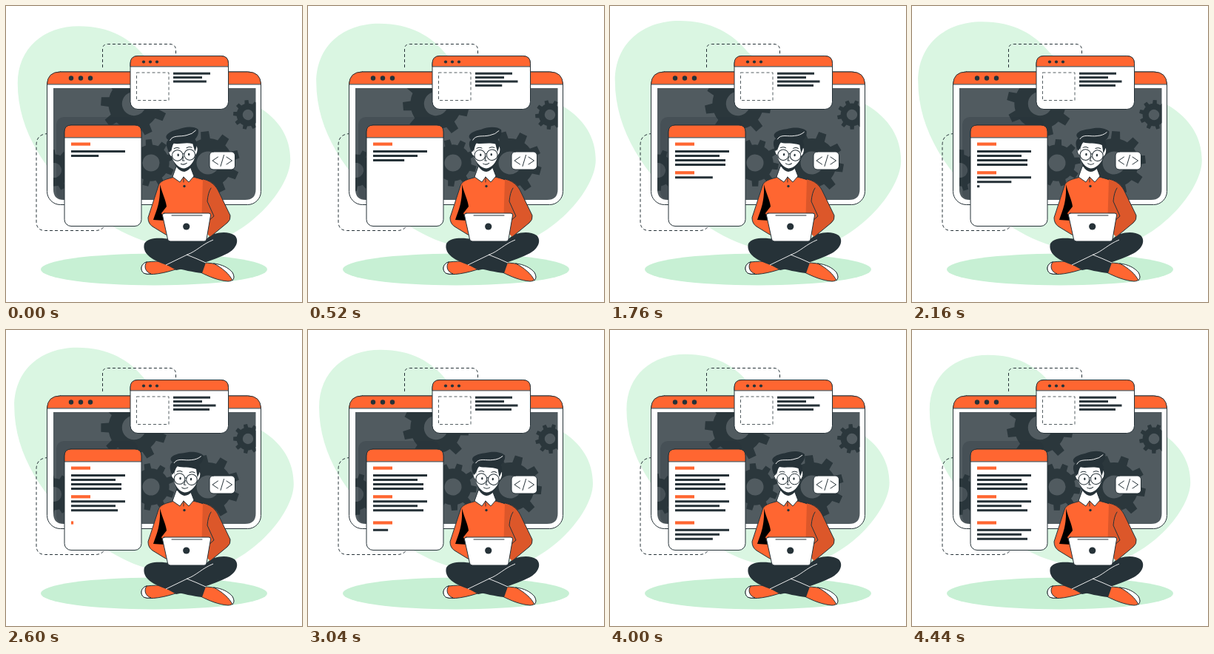
Write an HTML page that moves like this. It is 400x400 px and loops after 5680 ms.

```html
<!DOCTYPE html>
<html lang="en">
<head>
<meta charset="utf-8">
<title>Developer at work</title>
<style>
html, body { margin: 0; width: 100%; height: 100%; overflow: hidden; background: #fff; }
svg { display: block; width: 100vw; height: 100vh; }
.ink { stroke: #263238; stroke-width: 1; stroke-linejoin: round; stroke-linecap: round; }
.dash { fill: none; stroke: #263238; stroke-width: 1; stroke-dasharray: 4 3; }
.none { fill: none; }
.white { fill: #fff; }
.dark { fill: #263238; }
.orange { fill: #ff6631; }
.shade { fill: #dc572a; }
.glint { fill: none; stroke: #fff; stroke-width: .9; }
</style>
</head>
<body>
<svg viewBox="0 0 400 400" xmlns="http://www.w3.org/2000/svg">
  <defs>
    <clipPath id="screen"><path d="M64 111H337.500V248Q337.500 262 323 262H78Q64 262 64 248Z"/></clipPath>
  </defs>

  <path id="blob" fill="#daf6e2" d="M24 108C24 62 58 34 103 34C143 34 169 50 187 72C222 108 290 112 333 137C362 154 376 178 376 206C376 246 312 319 238 319C185 319 142 294 108 264C62 224 24 170 24 108Z"/>
  <ellipse cx="200" cy="356" rx="153" ry="21.500" fill="#c7f0d4"/>

  <path class="dash" d="M130.500 83V58Q130.500 51.500 138 51.500H221Q229.500 51.500 229.500 60V68"/>
  <path class="dash" d="M57 172.500Q41 173 41 188V291Q41 303.500 53 303.500H120Q131 303.500 133 296"/>

  <!-- main window -->
  <rect class="ink white" x="55.500" y="89" width="289" height="179.500" rx="18"/>
  <path class="ink orange" d="M55.500 105.500Q56 89 73.500 89H326.500Q344 89 344.500 105.500Z"/>
  <g clip-path="url(#screen)">
    <rect x="64" y="111" width="274" height="151" fill="#515b60"/>
    <g id="gears" fill="#2b373c" fill-rule="evenodd"></g>
    <rect x="68" y="150" width="110" height="112" rx="10" fill="#263238" opacity=".25"/>
  </g>

  <!-- cards -->
  <rect class="ink white" x="168" y="67.500" width="132.500" height="72" rx="10"/>
  <path class="ink orange" d="M168 81.500V77.500Q168 67.500 178 67.500H290.500Q300.500 67.500 300.500 77.500V81.500Z"/>
  <rect class="dash" x="176.500" y="90" width="43.500" height="37.500" style="stroke:#555f63"/>
  <rect class="ink white" x="79" y="161" width="104" height="136.500" rx="9"/>
  <path class="ink orange" d="M79 177.500V170Q79 161 88 161H174Q183 161 183 170V177.500Z"/>
  <g id="dots" class="dark"></g>
  <g id="lines"></g>

  <!-- code badge -->
  <rect class="ink white" x="275" y="197" width="34.500" height="24" rx="5"/>
  <path class="ink none" d="M286.500 204L279 209L286.500 214M298 204L305.500 209L298 214M294.500 201.500L290 216.500"/>

  <!-- legs and shoes -->
  <path class="ink orange" d="M216 345C207 345 198 345 190 346C182 348 181 357 186 361C194 365 215 361 232 355Z"/>
  <path class="ink white" d="M190 346C182 348 181 357 186 361Q191 363 196 362C188 359 186 352 190 346Z"/>
  <path class="ink orange" d="M268 347C281 347 297 351 305 359C310 366 308 372 300 372C287 371 275 366 263 360Z"/>
  <path class="ink white" d="M281 348C292 349 301 354 306 360Q310 367 306 371C302 362 292 354 281 348Z"/>
  <path class="dark" d="M219 314H272C279 306 299 303 309 310C316 317 311 328 300 334C280 344 252 353 230 357L212 347L240 330Z"/>
  <path class="dark" d="M187 321C192 312 210 313 222 315C240 321 258 335 270 347L265 361C240 358 211 350 197 341C188 335 185 328 187 321Z"/>
  <path class="glint" d="M216 350L245 336C258 331 265 322 280 316M244 336Q257 341 270 347"/>

  <!-- torso -->
  <path class="ink orange" d="M228 231C216 234 208 236 206 243L192 286Q192 294 198 298L216 309H272L274 240C268 234 260 233 253 231Z"/>
  <path d="M208 241C211 253 216 262 217 271L210 280L215 290L199 289C204 275 209 264 208 241Z"/>
  <path class="shade" d="M266 234C279 236 284 243 288 252L303 283Q304 289 299 293L276 312L264 300Z"/>
  <path class="ink none" d="M262 233C277 235 284 243 288 252L303 283Q304 289 299 293L276 312M273 291L281 284L272 264Q273 252 277 246"/>
  <path class="ink white" d="M230 217L225 231L235 238L240 231L247 238L254 230L249 217Z"/>
  <path class="ink none" d="M240 231V238"/>
  <circle class="dark" cx="241" cy="243.500" r="1.700"/>

  <g id="head">
    <path class="dark" d="M226 203C228 215 233 223 241 224C249 223 254 215 257 203Z"/>
    <path class="ink white" d="M225 190C219 187 220 203 227 203ZM257 190C263 187 262 203 255 203Z"/>
    <path class="white" d="M225.500 184H257V203C255 212 248 219 241 219.500C234 219 227 211 225.500 203Z"/>
    <path class="dark" d="M222.500 197C218 189 218 182 222 180C214 174 225 168 236 166.500C245 163 258 163 263 168C264 175 260 179 258 181C262 186 259 193 257 198L254.500 187C245 184 236 187 229 185C226 188 227 193 222.500 197Z"/>
    <path class="glint" d="M224 181C228 173 238 177 247 175Q255 174 260 169"/>
    <g class="ink none">
      <circle cx="233" cy="201.500" r="7.300"/><circle cx="249.500" cy="201.500" r="7.300"/>
      <path d="M240.300 200Q241.300 199 242.200 200M241 203L239.500 209H242M237 213Q241 215.500 245 212.500M229 192Q233 190 236 192M246 192Q250 190 253 192"/>
    </g>
    <ellipse class="dark" cx="234" cy="201" rx="1.200" ry="1.800"/>
    <ellipse class="dark" cx="248.500" cy="201" rx="1.200" ry="1.800"/>
  </g>

  <!-- laptop -->
  <path class="ink white" d="M214 280H274Q277 280 276.500 283L271 315Q270.500 318 268 318H222Q219 318 218.500 315L211.500 283Q211 280 214 280Z"/>
  <path class="ink none" d="M224 283H265"/>
  <circle class="dark" cx="243.700" cy="298" r="4.600"/>
</svg>
<script>
const LOOP = 5680, END = 4440, CYCLE = 6000, TYPE = 500;
const TEETH = 9, GEAR_ANGLE = 24;
const NS = "http://www.w3.org/2000/svg";
const $ = id => document.getElementById(id);

function add(parent, tag, attrs) {
  const el = document.createElementNS(NS, tag);
  for (const k in attrs) el.setAttribute(k, attrs[k]);
  return parent.appendChild(el);
}

function gearPath(r) {
  const step = 2 * Math.PI / TEETH, root = r * 0.77, hole = r * 0.36;
  const at = (rad, turn) => {
    const a = turn * step;
    return (rad * Math.cos(a)).toFixed(2) + " " + (rad * Math.sin(a)).toFixed(2);
  };
  let d = "";
  for (let i = 0; i < TEETH; i++) {
    d += (i ? "L" : "M") + at(root, i - 0.27) + "L" + at(r, i - 0.18) +
      "L" + at(r, i + 0.18) + "L" + at(root, i + 0.27) +
      `A${root} ${root} 0 0 1 ` + at(root, i + 0.73);
  }
  return d + `ZM${hole} 0A${hole} ${hole} 0 1 0 ${-hole} 0A${hole} ${hole} 0 1 0 ${hole} 0Z`;
}

const gears = [[173, 132, 45], [196, 212, 32], [273, 212, 43], [327, 147, 20], [65, 222, 28]]
  .map(([x, y, r]) => ({ x, y, el: add($("gears"), "path", { d: gearPath(r) }) }));

for (let i = 0; i < 3; i++) {
  add($("dots"), "circle", { cx: 88 + 13 * i, cy: 97.5, r: 3.2 });
  add($("dots"), "circle", { cx: 186 + 9 * i, cy: 75.5, r: 2.1 });
}

const lines = [];
function addLine(x, y, w, start, heading) {
  const h = heading ? 4.2 : 3;
  const fill = heading ? "#ff6631" : "#263238";
  lines.push({ w, start, el: add($("lines"), "rect", { x, y: y - h / 2, height: h, fill }) });
}

// A heading, then body rows that each begin one step later.
function addBlock(y, gap, rows, start, step) {
  addLine(88, y, 26, start, true);
  [73, 60, 68, 68].slice(0, rows).forEach((w, i) =>
    addLine(88, y + gap + 6 * i, w, start + step * (i + 1)));
}

[50, 39, 57.5, 49].forEach((w, i) => addLine(226, 91.2 + 5.4 * i, w, -1470 + 540 * i));
addBlock(186.6, 9.9, 4, -1350, 520);
addBlock(225.3, 6.4, 3, 1050, 362);
addBlock(260.5, 9.8, 3, 2540, 362);

const wave = (t, peak) => Math.cos(2 * Math.PI * (t - peak) / CYCLE);

function draw(t) {
  const s = 1.05 + 0.049 * wave(t, 1560);
  $("blob").setAttribute("transform", `translate(200 176.5) scale(${s}) translate(-200 -176.5)`);
  $("head").setAttribute("transform", `rotate(${4 * wave(t, 2500)} 240 223)`);
  const turn = GEAR_ANGLE + 360 * t / CYCLE;
  for (const g of gears)
    g.el.setAttribute("transform", `translate(${g.x} ${g.y}) rotate(${turn})`);
  for (const l of lines)
    l.el.setAttribute("width", l.w * Math.min(1, Math.max(0, (t - l.start) / TYPE)));
}

const begin = performance.now();
function tick() {
  const t = (performance.now() - begin) % LOOP;
  draw(Math.min(END, Math.floor(t / 40) * 40));
  requestAnimationFrame(tick);
}
tick();
</script>
</body>
</html>
```
